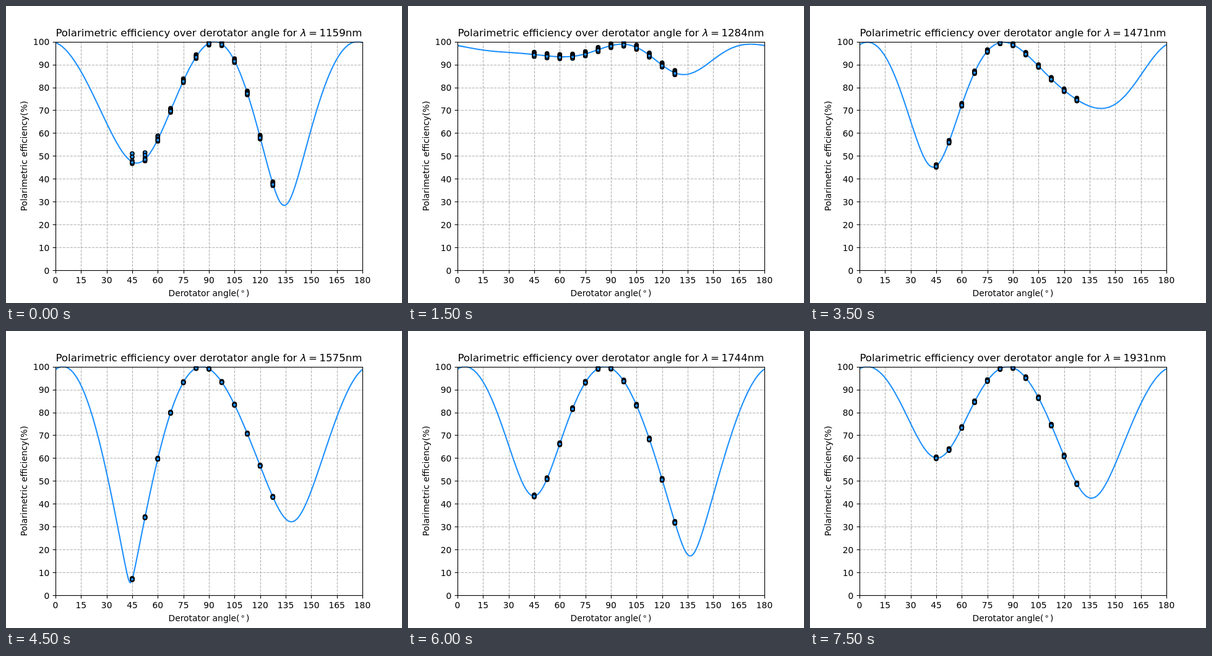
Write an HTML page with a canvas that moves like this. It is 640 px wide and 480 px high and loops after 8 s.

```html
<!DOCTYPE html>
<html lang="en">
<head>
<meta charset="utf-8">
<title>Polarimetric efficiency</title>
<style>
  html, body { margin: 0; width: 100%; height: 100%; overflow: hidden; background: #fff; }
  canvas { display: block; }
</style>
</head>
<body>
<canvas id="stage" width="640" height="480"></canvas>
<script>
const ctx = document.getElementById('stage').getContext('2d');
const FONT = '"DejaVu Sans", sans-serif';
const BLUE = '#1e90ff';
const LEFT = 80, RIGHT = 576, TOP = 57.6, BOTTOM = 427.2;
const STEP_MS = 500, STEPS = 16;

// Circular component V(x) = c0 + a1 cos x + b1 sin x + a2 cos 2x + b2 sin 2x, x = 2 * angle.
// Efficiency = sqrt(gain - V^2). Knots: [step, c0, a1, a2, b2, gain, dot spread]
const KNOTS = [
  [0, -.0323, .0136, -.0714, .0237, 1, .9],
  [3, -.006, .0022, -.1043, .0338, .978, 1],
  [7, -.0244, -.0012, -.1216, .04, .995, .65],
  [9, -.0605, -.0113, -.088, .0312, 1, .3],
  [11, -.0845, -.0097, -.0549, .0166, 1, .5],
  [13, -.0895, -.0216, -.0359, .0079, 1, .45],
  [15, -.0834, -.0224, -.0307, .0019, 1, .45]
];
const B1 = [-.9193, -.796, -.634, -.394, 0, .41, .6, .79,
            .913, .97, .98, .967, .9424, .9063, .877, .852];
const DOT_OFFSETS = [1, .6, .1, -.9, -.3];

const px = deg => LEFT + deg / 180 * (RIGHT - LEFT);
const py = pct => BOTTOM - pct / 100 * (BOTTOM - TOP);
const snap = v => Math.floor(v + .5) + .5;

function paramsAt(step) {
  const i = Math.max(1, KNOTS.findIndex(k => k[0] >= step));
  const a = KNOTS[i - 1], b = KNOTS[i];
  const f = (step - a[0]) / (b[0] - a[0]);
  return a.map((v, j) => v + (b[j] - v) * f).slice(1);
}

function efficiency(step) {
  const [c0, a1, a2, b2, gain] = paramsAt(step), b1 = B1[step];
  return deg => {
    const x = deg * Math.PI / 90;
    const v = c0 + a1 * Math.cos(x) + b1 * Math.sin(x)
            + a2 * Math.cos(2 * x) + b2 * Math.sin(2 * x);
    return 100 * Math.sqrt(Math.max(0, gain - v * v));
  };
}

function line(x1, y1, x2, y2) {
  ctx.beginPath();
  ctx.moveTo(x1, y1);
  ctx.lineTo(x2, y2);
  ctx.stroke();
}

function text(str, x, y, align = 'left', size = 13.89, style = '') {
  ctx.font = `${style} ${size}px ${FONT}`;
  ctx.textAlign = align;
  ctx.fillStyle = '#000';
  ctx.fillText(str, x, y);
}

function drawGrid() {
  ctx.strokeStyle = '#b0b0b0';
  ctx.lineWidth = 1.11;
  ctx.setLineDash([4.11, 1.78]);
  for (let d = 0; d <= 180; d += 15) line(snap(px(d)), BOTTOM, snap(px(d)), TOP);
  for (let p = 0; p <= 100; p += 10) line(LEFT, snap(py(p)), RIGHT, snap(py(p)));
  ctx.setLineDash([]);
}

function drawData(step) {
  const eff = efficiency(step), spread = paramsAt(step)[5];
  ctx.save();
  ctx.beginPath();
  ctx.rect(LEFT, TOP, RIGHT - LEFT, BOTTOM - TOP);
  ctx.clip();

  ctx.strokeStyle = BLUE;
  ctx.lineWidth = 2.08;
  ctx.lineJoin = 'round';
  ctx.beginPath();
  for (let d = 0; d <= 180; d += .5) ctx.lineTo(px(d), py(eff(d)));
  ctx.stroke();

  ctx.strokeStyle = '#000';
  ctx.fillStyle = BLUE;
  ctx.lineWidth = 1.7;
  for (let d = 45; d <= 127.5; d += 7.5) {
    // The first readings scatter upwards at small angles.
    const lift = 1 + Math.max(0, 1 - step / 3) * 3 * Math.exp(-(((d - 45) / 13) ** 2));
    for (const o of DOT_OFFSETS) {
      ctx.beginPath();
      ctx.arc(px(d), py(eff(d) + o * spread * (o > 0 ? lift : 1)), 3, 0, 7);
      ctx.fill();
      ctx.stroke();
    }
  }
  ctx.restore();
}

function drawAxes() {
  ctx.strokeStyle = '#000';
  ctx.lineWidth = 1.11;
  const l = snap(LEFT), r = snap(RIGHT), t = snap(TOP), b = snap(BOTTOM);
  ctx.strokeRect(l, t, r - l, b - t);
  for (let d = 0; d <= 180; d += 15) {
    line(snap(px(d)), b, snap(px(d)), b + 4.86);
    text(d, px(d), 448, 'center');
  }
  for (let p = 0; p <= 100; p += 10) {
    line(l, snap(py(p)), l - 4.86, snap(py(p)));
    text(p, 70.3, py(p) + 5.3, 'right');
  }

  text('Derotator angle(', 262.5, 469);
  text(')', 388, 469);
  ctx.lineWidth = .9;
  ctx.beginPath();
  ctx.arc(382.7, 461.3, 1.6, 0, 7);
  ctx.stroke();

  ctx.save();
  ctx.translate(34, 242.4);
  ctx.rotate(-Math.PI / 2);
  text('Polarimetric efficiency(%)', 0, 0, 'center');
  ctx.restore();
}

function drawTitle(step) {
  const nm = Math.floor(1159.56 * (1931.79 / 1159.56) ** (step / 15));
  const y = 49.3, size = 16.67;
  text('Polarimetric efficiency over derotator angle for', 80.4, y, 'left', size);
  text('λ', 475.7, y, 'left', size, 'italic');
  text('=', 489, y, 'left', size);
  text(nm + 'nm', 575.6, y, 'right', size);
}

let shown = -1;
function frame() {
  const step = Math.floor(performance.now() / STEP_MS) % STEPS;
  if (step !== shown) {
    shown = step;
    ctx.fillStyle = '#fff';
    ctx.fillRect(0, 0, 640, 480);
    drawGrid();
    drawData(step);
    drawAxes();
    drawTitle(step);
  }
  requestAnimationFrame(frame);
}
frame();
</script>
</body>
</html>
```
